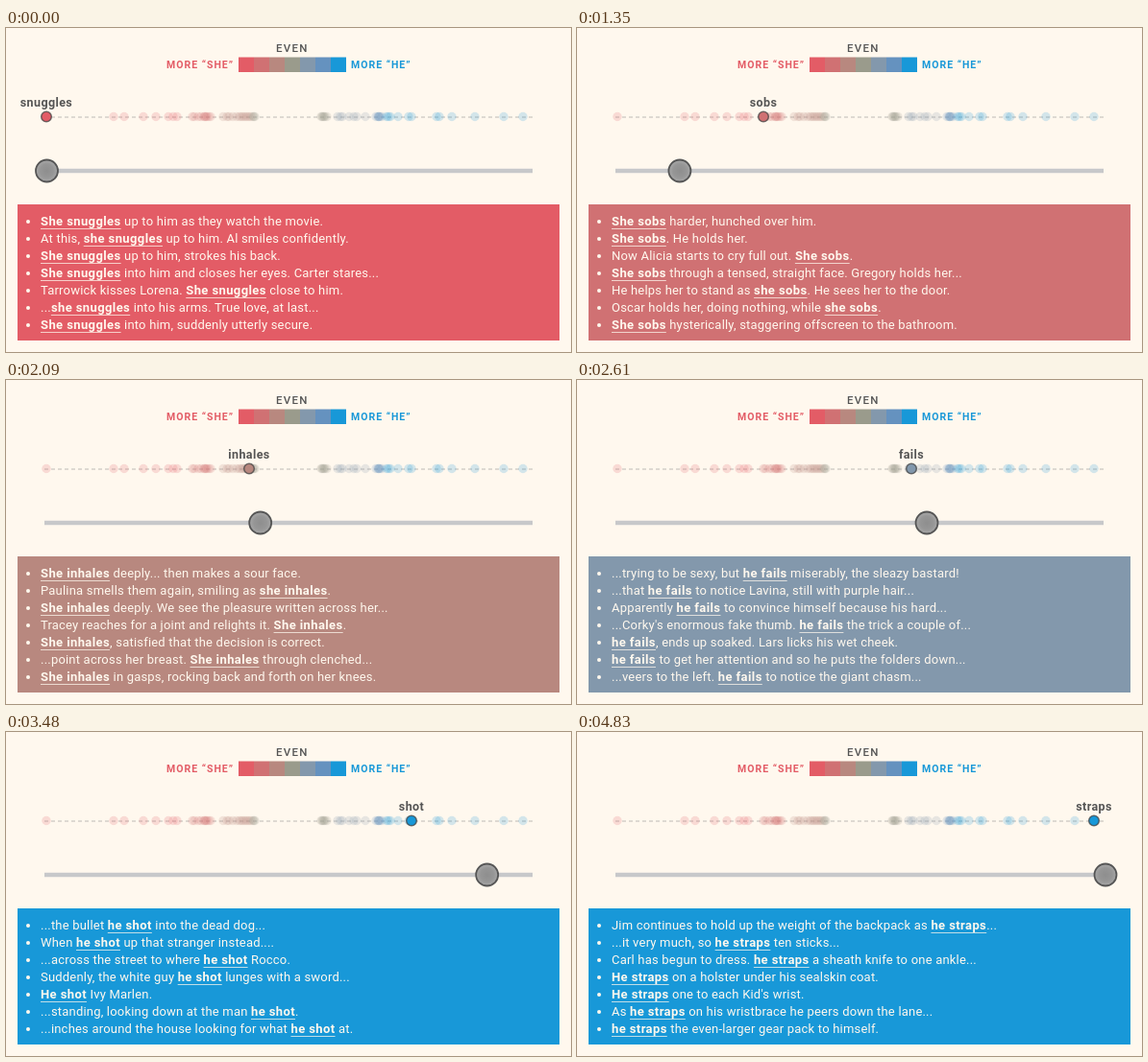
These frames come from a looping animation (588 by 338 pixels, 4880 ms). An HTML page:

```html
<!DOCTYPE html>
<html lang="en">
<head>
<meta charset="utf-8">
<style>
  html, body { margin: 0; width: 100%; height: 100%; overflow: hidden; background: #fff8ee; }
  body { position: relative; font-family: Roboto, sans-serif; }
  svg { position: absolute; left: 0; top: 0; }
  .legend { font-size: 10.5px; font-weight: 700; letter-spacing: 1px; }
  #word { font-size: 12.5px; font-weight: 700; letter-spacing: .4px; fill: #555; text-anchor: middle; }
  #panel {
    position: absolute; left: 12px; top: 183.5px; width: 564px; height: 142px; box-sizing: border-box;
    margin: 0; padding: 9px 0 0 24px; list-style: none; color: #fff8ee;
    font-size: 13px; line-height: 18px; letter-spacing: .2px; white-space: nowrap;
  }
  li { position: relative; height: 18px; }
  li::before {
    content: ""; position: absolute; left: -15px; top: 7px; width: 4px; height: 4px;
    border-radius: 50%; background: currentColor;
  }
  b {
    letter-spacing: .4px; text-decoration: underline 1px #fff8eebb;
    text-underline-offset: 3px; text-decoration-skip-ink: none;
  }
</style>
</head>
<body>
<svg width="588" height="338" viewBox="0 0 588 338">
  <defs>
    <radialGradient id="metal">
      <stop offset="0" stop-color="#8e8e8e"/>
      <stop offset=".6" stop-color="#969696"/>
      <stop offset="1" stop-color="#a8a8a8"/>
    </radialGradient>
  </defs>
  <text x="281" y="25" font-size="11.5" font-weight="500" letter-spacing="1.3" fill="#555">EVEN</text>
  <text class="legend" x="167" y="41.5" fill="#e35c66">MORE “SHE”</text>
  <text class="legend" x="359" y="41.5" fill="#1898d8">MORE “HE”</text>
  <g id="swatches"></g>
  <path d="M40 93H548" stroke="#bdbab5" stroke-dasharray="4 3"/>
  <g id="dots" opacity=".95"></g>
  <circle id="chosen" cy="92.5" r="5.3" stroke="#444" stroke-opacity=".75" stroke-width="1.5"/>
  <text id="word" y="82"></text>
  <path d="M40 149H548" stroke="#c7c8ca" stroke-width="4.6"/>
  <circle id="knob" cy="149" r="11.5" fill="url(#metal)" stroke="#555" stroke-width="1.8"/>
</svg>
<ul id="panel"></ul>
<script>
const LOOP = 4880, START = 42, SPAN = 508;
const $ = id => document.getElementById(id);

const colors = ["#e35c66", "#d07173", "#b8887f", "#9a9b8c", "#8398ac", "#6592bf", "#1898d8"];
const limits = [185, 220, 256, 340, 380, 394];
const colorAt = x => colors[limits.filter(limit => x > limit).length];

const verbs = [
  42, 112, 123, 143, 156, 169, 174, 178, 194, 196, 200, 203, 206, 207, 208, 209, 211,
  213, 226, 230, 232, 236, 240, 243, 245, 247, 249, 251, 253, 255, 257, 258, 259,
  328, 329, 330, 331, 332, 334, 345, 348, 350, 357, 362, 365, 374, 385, 387, 388, 388,
  389, 391, 396, 398, 400, 408, 419, 422, 448, 451, 464, 488, 518, 538
];

// Slider drag: time in ms, knob x
const drag = [[0, 42.5], [1040, 64], [1650, 171], [2090, 264.5], [3090, 443], [3870, 535.5], [4830, 550]];

// index of the verb, the verb, its lines with the phrase between asterisks
const scenes = [
  [0, "snuggles", `*She snuggles* up to him as they watch the movie.
At this, *she snuggles* up to him. Al smiles confidently.
*She snuggles* up to him, strokes his back.
*She snuggles* into him and closes her eyes. Carter stares...
Tarrowick kisses Lorena. *She snuggles* close to him.
...*she snuggles* into his arms. True love, at last...
*She snuggles* into him, suddenly utterly secure.`],
  [3, "sobs", `*She sobs* harder, hunched over him.
*She sobs*. He holds her.
Now Alicia starts to cry full out. *She sobs*.
*She sobs* through a tensed, straight face. Gregory holds her...
He helps her to stand as *she sobs*. He sees her to the door.
Oscar holds her, doing nothing, while *she sobs*.
*She sobs* hysterically, staggering offscreen to the bathroom.`],
  [16, "utters", `*She utters* something guttural, unintelligible...
*She utters* a little moan.
Sandra's eyes are wide with terror. *She utters* a gurgling...
As soon as *she utters* her question she notices a silvery...
*She utters* a litle scream and shrinks back against the wall...
... *she utters* sadly, holding him tight.
This can't be real. Has he lost his mind? *She utters* under...`],
  [28, "inhales", `*She inhales* deeply... then makes a sour face.
Paulina smells them again, smiling as *she inhales*.
*She inhales* deeply. We see the pleasure written across her...
Tracey reaches for a joint and relights it. *She inhales*.
*She inhales*, satisfied that the decision is correct.
...point across her breast. *She inhales* through clenched...
*She inhales* in gasps, rocking back and forth on her knees.`],
  [50, "fails", `...trying to be sexy, but *he fails* miserably, the sleazy bastard!
...that *he fails* to notice Lavina, still with purple hair...
Apparently *he fails* to convince himself because his hard...
...Corky's enormous fake thumb. *he fails* the trick a couple of...
*he fails*, ends up soaked. Lars licks his wet cheek.
*he fails* to get her attention and so he puts the folders down...
...veers to the left. *he fails* to notice the giant chasm...`],
  [61, "shot", `...the bullet *he shot* into the dead dog...
When *he shot* up that stranger instead....
...across the street to where *he shot* Rocco.
Suddenly, the white guy *he shot* lunges with a sword...
*He shot* Ivy Marlen.
...standing, looking down at the man *he shot*.
...inches around the house looking for what *he shot* at.`],
  [63, "straps", `Jim continues to hold up the weight of the backpack as *he straps*...
...it very much, so *he straps* ten sticks...
Carl has begun to dress. *he straps* a sheath knife to one ankle...
*He straps* on a holster under his sealskin coat.
*He straps* one to each Kid's wrist.
As *he straps* on his wristbrace he peers down the lane...
*he straps* the even-larger gear pack to himself.`]
];

// Monotone cubic through the drag points
const slopes = drag.slice(1).map(([t, x], i) => (x - drag[i][1]) / (t - drag[i][0]));
const tangents = drag.map((_, i) => {
  const a = slopes[i - 1], b = slopes[i];
  return a && b ? 2 * a * b / (a + b) : 0;
});
function knobAt(time) {
  const t = Math.min(time, drag.at(-1)[0]);
  const i = Math.max(0, drag.findIndex(([end]) => t <= end) - 1);
  const [t0, x0] = drag[i], [t1, x1] = drag[i + 1];
  const d = t1 - t0, u = (t - t0) / d, v = 1 - u;
  return v * v * (1 + 2 * u) * x0 + u * u * (3 - 2 * u) * x1
    + d * u * v * (v * tangents[i] - u * tangents[i + 1]);
}

$("swatches").innerHTML = colors.map((c, i) =>
  `<rect x="${242 + 16 * i}" y="30.5" width="16" height="15.5" fill="${c}"/>`).join("");
$("dots").innerHTML = verbs.map(x =>
  `<circle cx="${x}" cy="92.5" r="4.7" fill="${colorAt(x)}" fill-opacity=".2"/>`).join("");

let shown;
function showScene(scene) {
  if (scene === shown) return;
  shown = scene;
  $("word").textContent = scene[1];
  $("panel").innerHTML = scene[2].split("\n")
    .map(line => `<li>${line.replace(/\*(.+?)\*/, "<b>$1</b>")}</li>`).join("");
}

function draw(now) {
  const knob = knobAt(now % LOOP);
  const index = Math.min(verbs.length - 1, Math.round((knob - START) / SPAN * (verbs.length - 1)));
  const x = verbs[index];
  const gap = scene => Math.abs(scene[0] - index);
  showScene(scenes.reduce((best, scene) => gap(scene) < gap(best) ? scene : best));
  $("knob").setAttribute("cx", knob);
  $("chosen").setAttribute("cx", x);
  $("chosen").setAttribute("fill", colorAt(x));
  $("word").setAttribute("x", x);
  $("panel").style.background = colorAt(x);
}

const begin = performance.now();
function tick() {
  draw(performance.now() - begin);
  requestAnimationFrame(tick);
}
tick();
</script>
</body>
</html>
```
